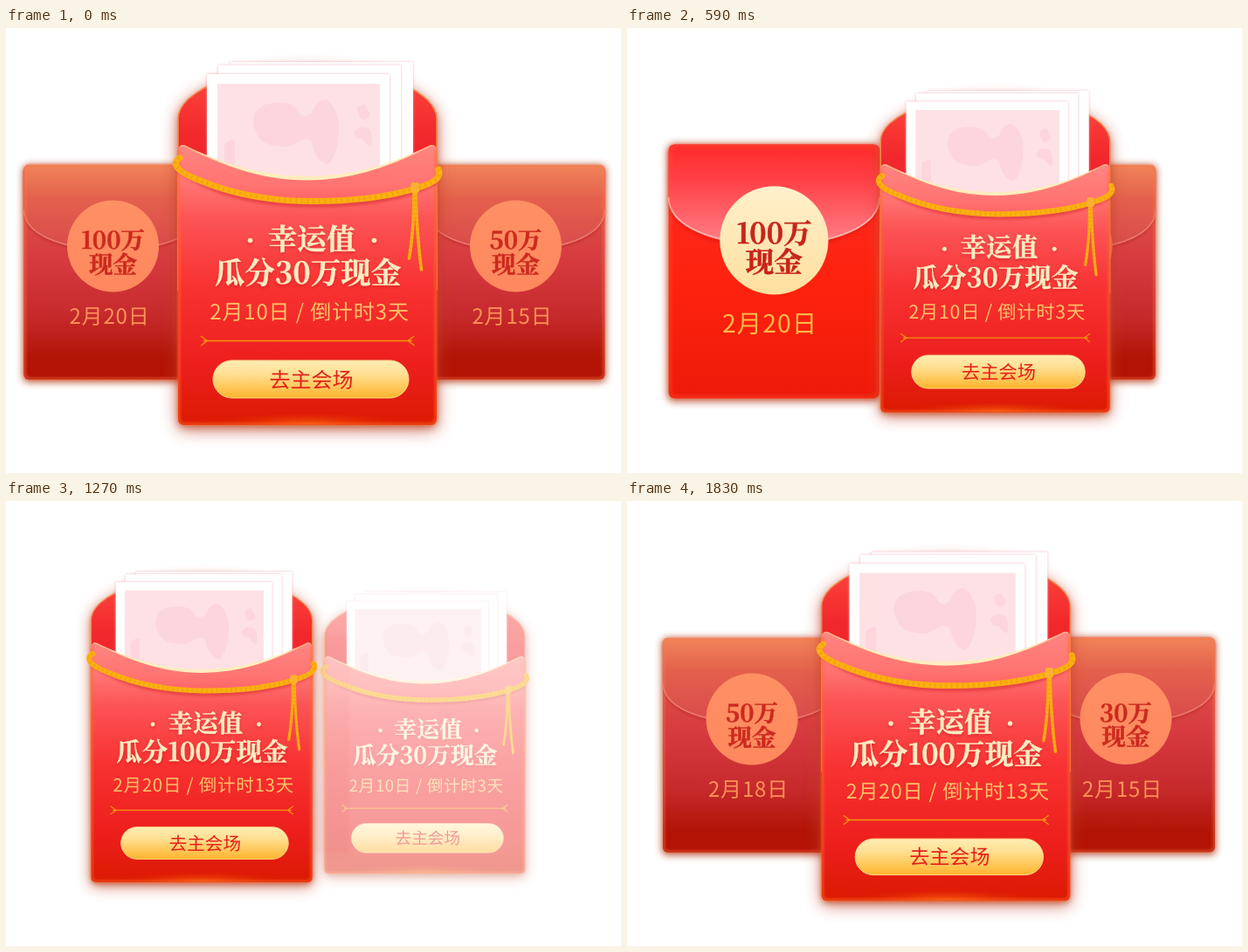
An HTML page for the animation above (1860 ms loop, 704 by 510 pixels).

```html
<!DOCTYPE html>
<html lang="zh-CN">
<head>
<meta charset="utf-8">
<title>瓜分现金</title>
<style>
html, body { margin: 0; width: 100%; height: 100%; overflow: hidden; background: #fff; }
svg { display: block; width: 704px; height: 510px; }
text { text-anchor: middle; text-rendering: geometricPrecision; }
.serif { font-family: "Noto Serif CJK SC", "Noto Serif", "Noto Sans CJK SC", serif; font-weight: 900; stroke-width: .5; }
.sans { font-family: "Noto Sans CJK SC", "Noto Sans", sans-serif; font-size: 24px; }
.wide { letter-spacing: .85px; }
</style>
</head>
<body>
<svg id="stage" viewBox="0 0 704 510"></svg>
<script>
const LOOP = 1860;
const stage = document.getElementById('stage');

const gradient = (id, ...stops) =>
  `<linearGradient id="${id}" x2="0" y2="1">${stops.map(([at, color]) =>
    `<stop offset="${at}" stop-color="${color}"/>`).join('')}</linearGradient>`;

const blur = (id, size) =>
  `<filter id="${id}" x="-30%" y="-30%" width="160%" height="160%"><feGaussianBlur stdDeviation="${size}"/></filter>`;

const defs = `<defs>
  ${gradient('back', [0, '#ff4a40'], [.3, '#f2282c'], [1, '#d81a1a'])}
  ${gradient('front', [0, '#ff8580'], [.14, '#ff7472'], [.26, '#fc5456'], [.5, '#f83232'], [.8, '#ec1e1c'], [1, '#dc1a02'])}
  ${gradient('button', [0, '#ffecb2'], [.35, '#ffe094'], [1, '#ffb42c'])}
  ${gradient('litBody', [0, '#ff2c28'], [.55, '#fe220e'], [1, '#ee1a0a'])}
  ${gradient('litFlap', [0, '#ff2a2a'], [.35, '#ff4046'], [1, '#ff8088'])}
  ${gradient('litCoin', [0, '#fff0cc'], [1, '#ffdf9e'])}
  ${gradient('dimBody', [0, '#e0604c'], [.45, '#d63a40'], [.7, '#c62a2c'], [.9, '#b21406'], [1, '#b41204'])}
  ${gradient('dimFlap', [0, '#f0845a'], [.4, '#e4604c'], [1, '#d84a4c'])}
  ${gradient('dimCoin', [0, '#ff9064'], [1, '#ff885e'])}
  <radialGradient id="ember"><stop stop-color="#f8660c"/><stop offset="1" stop-color="#f04008" stop-opacity="0"/></radialGradient>
  ${blur('halo', 10)}${blur('soft', 4)}${blur('fine', 1.6)}
</defs>`;

const serif = (x, y, size, fill, body) =>
  `<text class="serif" x="${x}" y="${y}" font-size="${size}" fill="${fill}" stroke="${fill}">${body}</text>`;
const sans = (x, y, fill, body, cls = '') =>
  `<text class="sans ${cls}" x="${x}" y="${y}" fill="${fill}">${body}</text>`;

function note(x, y) {
  return `<rect x="${x}" y="${y}" width="209" height="130" fill="#f3a3b0" opacity=".8" filter="url(#fine)"/>
    <rect x="${x}" y="${y}" width="209" height="130" fill="#fff"/>`;
}

const printed = `
  <rect x="242" y="64" width="186" height="120" fill="#fde1e5"/>
  <g fill="#fcd6dc">
    <path d="M283 108Q284 88 306 86Q330 83 336 98Q342 104 350 97Q355 82 367 82Q383 94 381 122Q378 150 368 156Q354 153 350 130Q342 124 333 131Q322 139 310 135Q288 135 283 108Z"/>
    <path d="M402 92Q412 83 414 94Q420 100 411 105Q404 106 402 92ZM398 120Q406 108 417 117Q421 128 418 136Q412 134 408 127Q400 128 398 120Z"/>
    <path d="M250 133Q258 126 262 130V160H250Z"/>
  </g>`;

const BACK = 'M197 300V104Q197 93 208 82C240 54 290 45 345 45S450 54 482 82Q493 93 493 104V300Z';
const FRONT = 'M197 140Q197 133 205 134.5Q345 208 485 134.5Q493 133 493 140V448Q493 455 486 455H204Q197 455 197 448Z';
const HALO = 'M197 448V104Q197 93 208 82C240 54 290 45 345 45S450 54 482 82Q493 93 493 104V448Q493 455 486 455H204Q197 455 197 448Z';
const ROPE = 'M199 149C187 156 199 166 220 174C260 191 305 198.500 350 198.500C400 198.500 445 192 475 182C490 177 499 171 495 162';
const TAIL = 'M467 187Q467 232 461.500 264M469 187Q470 235 475.500 277';

function openEnvelope(sum, day, left) {
  const title = (fill) =>
    `<circle cx="279.500" cy="243.500" r="2.800" fill="${fill}"/><circle cx="421.500" cy="243.500" r="2.800" fill="${fill}"/>` +
    serif(350, 253.5, 33.5, fill, '幸运值') +
    serif(345.5, 292.5, 34.5, fill, `瓜分${sum}万现金`);
  return `<g transform="translate(-345 -294.500)">
    <path d="${HALO}" transform="translate(0 5)" fill="#c4452c" opacity=".72" filter="url(#halo)"/>
    <path d="${HALO}" transform="translate(0 3)" fill="#a83a1c" opacity=".5" filter="url(#soft)"/>
    <path d="${BACK}" fill="url(#back)" stroke="#f58a48" stroke-width="1.500"/>
    ${note(257, 39)}${note(243, 42.5)}${note(230, 53)}${printed}
    <path d="${FRONT}" fill="url(#front)"/>
    <ellipse cx="345" cy="453" rx="105" ry="11" fill="url(#ember)" opacity=".75" clip-path="inset(0 0 9px 0)"/>
    <path d="M198 140V447Q198 454 205 454H485Q492 454 492 447V140" fill="none" stroke="#ff6a28" stroke-width="2.500" opacity=".75" filter="url(#fine)"/>
    <path d="M200 136Q201 133.500 206 136Q345 208 484 136Q489 133.500 490 136" fill="none" stroke="#ffb088" stroke-width="1.600"/>
    <path d="M212 138Q345 211 478 138Q345 202 212 138Z" fill="#ffedbd"/>
    <path d="M198 163C240 194 300 203 350 203S455 198 492 177" fill="none" stroke="#d02428" stroke-width="5" opacity=".5" filter="url(#fine)"/>
    <g fill="none" stroke-linecap="round">
      <path d="${ROPE}" stroke="#fbb010" stroke-width="7"/>
      <path d="${ROPE}" stroke="#e69206" stroke-width="5" stroke-dasharray="1.500 5" stroke-linecap="butt" opacity=".5"/>
      <path d="${TAIL}" stroke="#f8ae12" stroke-width="3.600"/>
      <path d="${TAIL}" stroke="#de8c08" stroke-width="2.600" stroke-dasharray="1 4" stroke-linecap="butt" opacity=".5"/>
    </g>
    <rect x="463.500" y="177" width="9.500" height="12" rx="2.500" fill="#fcb030"/>
    <g transform="translate(0 2)" opacity=".4" filter="url(#fine)">${title('#b41414')}</g>
    ${title('#ffebc2')}
    ${sans(347.5, 333.5, '#ffc36a', `${day} / 倒计时${left}天`, 'wide')}
    <path d="M231 358.500H460M223 353L230.500 358.500L223 364M226 358.500H231M467.500 353L460 358.500L467.500 364M460 358.500H465" fill="none" stroke="#f6920f" stroke-width="1.400"/>
    <rect x="237" y="381" width="224" height="43" rx="21.500" fill="url(#button)" stroke="#ffdc90"/>
    ${sans(349.5, 411.5, '#e2201a', '去主会场')}
  </g>`;
}

const FLAP_EDGE = 'M-102 -72C-102 -44 -60 -26 0 -26S102 -44 102 -72';
const FLAP = FLAP_EDGE + 'V-117Q102 -123 96 -123H-96Q-102 -123 -102 -117Z';

function closedFace(tone, sum, day, ink, dateInk, rim, edge) {
  return `<rect x="-102" y="-123" width="204" height="246" rx="6" fill="url(#${tone}Body)"/>
    <path d="${FLAP}" transform="translate(0 3)" fill="#a01010" opacity=".3" filter="url(#fine)"/>
    <path d="${FLAP}" fill="url(#${tone}Flap)"/>
    <path d="${FLAP_EDGE}" fill="none" stroke="${rim}" stroke-width="1.600"/>
    <rect x="-101" y="-122" width="202" height="244" rx="6" fill="none" stroke="${edge}" stroke-width="2" opacity=".7" filter="url(#fine)"/>
    <circle cy="-30" r="52.500" fill="url(#${tone}Coin)"/>
    ${serif(0, -27, 27.5, ink, sum + '万')}
    ${serif(0, 0.5, 27.5, ink, '现金')}
    ${sans(-4, 59, dateInk, day, 'wide')}`;
}

const dimFace = (sum, day) => closedFace('dim', sum, day, '#cc2a1e', '#ff9258', '#ec7a70', '#f87a48');
const litFace = (sum, day) => closedFace('lit', sum, day, '#c8241a', '#ffb848', '#ffb4ac', '#ff5a30');

const closedShadow =
  '<rect x="-103" y="-123" width="206" height="249" rx="6" fill="#b04020" opacity=".85" filter="url(#soft)"/>';

// Back to front
const layers = {
  nextOut: closedShadow + dimFace(50, '2月15日'),
  nextIn: closedShadow + dimFace(50, '2月18日'),
  shut: closedShadow + dimFace(30, '2月15日'),
  left: closedShadow + litFace(100, '2月20日') + `<g id="dim">${dimFace(100, '2月20日')}</g>`,
  first: openEnvelope(30, '2月10日', 3),
  second: openEnvelope(100, '2月20日', 13)
};
stage.innerHTML = defs + Object.entries(layers).map(([id, art]) => `<g id="${id}">${art}</g>`).join('');

const ramp = (t, from, to) => Math.min(1, Math.max(0, (t - from) / (to - from)));
const ease = (t, from, to) => (1 - Math.cos(Math.PI * ramp(t, from, to))) / 2;
const mix = (a, b, p) => a + (b - a) * p;

function place(id, x, y, scale, opacity) {
  const el = document.getElementById(id);
  el.setAttribute('display', opacity > 0 ? 'inline' : 'none');
  el.setAttribute('opacity', opacity);
  el.setAttribute('transform', `translate(${x} ${y}) scale(${scale})`);
}

function draw(t) {
  const p = ease(t, 60, 900);
  const grow = ease(t, 45, 905);
  const q = ease(t, 1060, 1760);
  const away = ease(t, 1085, 1692);

  place('nextOut', mix(583.5, 494, ease(t, 75, 725)) - 60 * q, 280, 1, 1 - ramp(t, 1080, 1210));
  place('nextIn', mix(321, 143, ease(t, 1060, 1830)), 280, 1, ramp(t, 1248, 1690));
  place('shut', mix(454, 571, away), 279.5, mix(1.45, 1, away), ramp(t, 1425, 1750));

  place('left', mix(122.5, 187.5, grow), mix(280, 278.5, grow), mix(1, 1.26, grow), 1 - ramp(t, 1060, 1180));
  document.getElementById('dim').setAttribute('opacity', 1 - ramp(t, 20, 230));

  place('first', mix(345, 454, p) + 118 * away, 294.5 + 5.5 * p + 12 * away,
    (mix(296, 248, p) - 86 * away) / 296, 1 - ramp(t, 1080, 1425));
  place('second', mix(187, 365, q), mix(298.5, 304, q), mix(245, 284.5, q) / 296, ramp(t, 860, 1040));
}

const start = performance.now();
function tick() {
  draw((performance.now() - start) % LOOP);
  requestAnimationFrame(tick);
}
tick();
</script>
</body>
</html>
```
